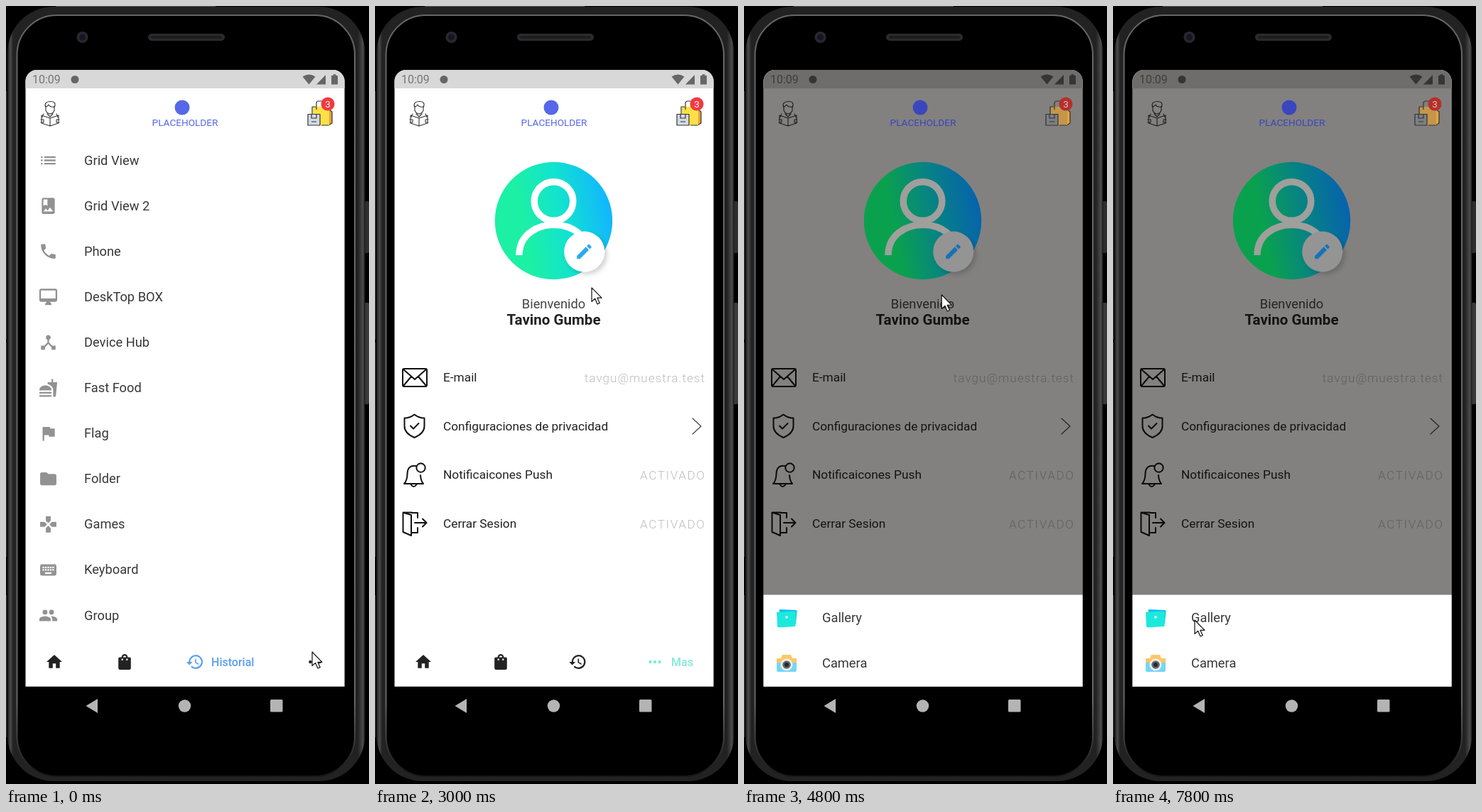
Write an HTML page that moves like this. It is 511 by 1096 pixels and loops after 8 s.

```html
<!DOCTYPE html>
<html lang="es">
<head>
<meta charset="utf-8">
<title>Perfil</title>
<style>
html, body { margin: 0; width: 100%; height: 100%; overflow: hidden; background: #000; }
svg {
  display: block; width: 511px; height: 1096px; font-family: Roboto, Arial, sans-serif;
  --brand: #5668e8; --bag: #fde047; --box: #d4dae4; --badge: #f23a3f; --badgeText: #fff;
  --a: #1cf0a4; --b: #12e3cf; --c: #12b4ff; --ring: #fff; --button: #fff; --pencil: #2caaf0;
}
svg.dim {
  --brand: #3a46bd; --bag: #c4964a; --box: #7c7f84; --badge: #b5302c; --badgeText: #d8c4c0;
  --a: #0aa14e; --b: #078580; --c: #0662ae; --ring: #9f9f9c; --button: #949494; --pencil: #1673b8;
}
.line { fill: none; stroke: #111; stroke-width: 2; stroke-linejoin: round; stroke-linecap: round; }
.item { font-size: 18.3px; fill: #383838; }
.row { font-size: 17.3px; fill: #222; }
.value { font-size: 17.14px; font-weight: 300; fill: #bdbdbd; text-anchor: end; }
.nav { font-size: 16px; font-weight: 500; }
</style>
</head>
<body>
<svg id="stage" viewBox="0 0 511 1096" xmlns="http://www.w3.org/2000/svg">
  <defs>
    <linearGradient id="metal">
      <stop offset="0" stop-color="#141414"/><stop offset=".008" stop-color="#4c4c4c"/>
      <stop offset=".016" stop-color="#222"/><stop offset=".98" stop-color="#222"/>
      <stop offset=".994" stop-color="#4c4c4c"/><stop offset="1" stop-color="#141414"/>
    </linearGradient>
    <linearGradient id="shine" x1="0" y1="0" x2="0" y2="1">
      <stop offset="0" stop-color="#666"/><stop offset=".9" stop-color="#666"/>
      <stop offset="1" stop-color="#161616"/>
    </linearGradient>
    <linearGradient id="skin" x1="0" y1=".6" x2="1" y2=".4">
      <stop offset="0" style="stop-color:var(--a)"/><stop offset=".25" style="stop-color:var(--a)"/>
      <stop offset=".58" style="stop-color:var(--b)"/><stop offset="1" style="stop-color:var(--c)"/>
    </linearGradient>
    <filter id="soft" x="-50%" y="-50%" width="200%" height="200%">
      <feDropShadow dx="3.5" dy="3.5" stdDeviation="3" flood-color="#000" flood-opacity=".18"/>
    </filter>
    <clipPath id="screen"><path d="M27.500 958.700V106a16 16 0 0 1 16-16H460.600a16 16 0 0 1 16 16V958.700z"/></clipPath>
  </defs>

  <g id="phone">
    <rect width="511" height="1096"/>
    <path d="M0 120V470M0 474V776M0 830V1030" stroke="#3a3a3a" stroke-width="2"/>
    <path d="M70 .5H295" stroke="#555"/>
    <rect x="504" y="275" width="7" height="73" rx="2" fill="#2e2e2e"/>
    <rect x="504" y="418" width="7" height="143" rx="2" fill="#3a3a3a"/>
    <rect x="2" y="1" width="503.500" height="1091" rx="65" fill="url(#metal)"/>
    <rect x="15.500" y="13" width="475.500" height="1072" rx="56" stroke="url(#shine)" stroke-width="2"/>
    <rect x="200" y="39" width="108" height="10" rx="5" fill="#2b2b2d"/>
    <rect x="204" y="42" width="100" height="4" rx="2" fill="#1d1d1f"/>
    <circle cx="107.500" cy="44" r="8" fill="#29292c"/>
    <circle cx="107.500" cy="44" r="4.500" fill="#14152c"/>
    <g fill="#b4b4b4">
      <path d="M112.500 986L129 976V996z"/>
      <circle cx="251.500" cy="986" r="8.700"/>
      <rect x="372" y="977" width="17.500" height="17.500" rx="1.500"/>
    </g>
  </g>

  <g clip-path="url(#screen)">
    <rect x="27" y="90" width="450" height="869" fill="#fff"/>
    <rect x="27" y="90" width="450" height="26" fill="#d8d8d8"/>
    <g fill="#666">
      <text x="37" y="109" font-size="16" fill="#777">10:09</text>
      <circle cx="97" cy="103.500" r="5.500"/>
      <path d="M417.500 99.500Q426.500 93.500 435.500 99.500L426.500 110.500z"/>
      <path d="M437 110.500L450 97V110.500z"/>
      <path d="M458 98h2.500v-1.800h4V98H467v12.500h-9z"/>
    </g>
    <g id="reader" class="line" style="stroke:#333;stroke-width:1.100">
      <path d="M56 141V147Q58 152 62 152Q66 152 68 147V141"/>
      <path d="M55.500 142Q53.500 135 62 134.500Q71 134 68.500 142Q62 143 60 139Q58 142 55.500 142z"/>
      <path d="M53 152Q51 155 51 157M71 152Q73 155 73 157M58 152L62 156L66 152"/>
      <path d="M50 154L62 158L74 154V165L62 169L50 165zM62 158V169M49 160h4v4h-4M75 160h-4v4h4"/>
    </g>
    <g id="list"></g>
    <g id="profile">
      <text x="251.500" y="426" font-size="18.300" text-anchor="middle" fill="#444">Bienvenido</text>
      <text x="251.500" y="449" font-size="20.570" font-weight="700" text-anchor="middle" fill="#222">Tavino Gumbe</text>
      <g class="row">
        <text x="96" y="529">E-mail</text>
        <text x="96" y="597.500">Configuraciones de privacidad</text>
        <text x="96" y="666">Notificaicones Push</text>
        <text x="96" y="735">Cerrar Sesion</text>
      </g>
      <g class="value">
        <text x="465" y="529.500" letter-spacing="1">tavgu@muestra.test</text>
        <text x="465.500" y="667" letter-spacing="1.600">ACTIVADO</text>
        <text x="465.500" y="735.500" letter-spacing="1.600">ACTIVADO</text>
      </g>
      <g class="line">
        <path d="M41 511H71Q73 511 73 513V534Q73 536 71 536H41Q39 536 39 534V513Q39 511 41 511zM40 512L56 526L72 512M40 535L51 522M72 535L61 522"/>
        <g class="loaded">
          <path d="M55.500 575.500Q62 580.500 69.500 580.500V592Q69.500 602 55.500 608Q41.500 602 41.500 592V580.500Q49 580.500 55.500 575.500zM50 591.500L54 595.500L61.500 588"/>
          <path d="M58 648Q46 646 45.500 659Q45.500 668 41 673H68Q64.500 669 64 661M50.500 674Q54.500 680 58.500 674"/>
          <circle cx="64.500" cy="650.500" r="6.200"/>
          <path d="M52 714H60V721M60 735V742H51M39.500 713.500L51 717V746L39.500 741zM39.500 713.500H52M56 728H72M67 722.500L72.500 728L67 733.500"/>
          <path d="M447 581L459 592L447 603" stroke="#444" stroke-width="1.200"/>
        </g>
      </g>
    </g>
    <g id="nav"></g>
    <rect id="shade" x="27" y="90" width="450" height="869" fill="#060500" opacity=".5"/>

    <g id="art">
      <circle cx="248" cy="143" r="10.500" fill="var(--brand)"/>
      <text x="252" y="168.500" font-size="13.600" text-anchor="middle" fill="var(--brand)">PLACEHOLDER</text>
      <g stroke="#333" stroke-width="1.200" stroke-linejoin="round">
        <path d="M454 145L459 149V165L454 168z" fill="#e8a33c"/>
        <path d="M432 142H455V168H432z" fill="var(--bag)" stroke="none"/>
        <path d="M437 146V137Q437 134 440 134H445Q448 134 448 137V146M431 152V142H436M454 168H444" fill="none"/>
        <path d="M425 152.500H442V168H425z" fill="var(--box)"/>
        <path d="M430 152.500V158H437V152.500M430 163H437" fill="none"/>
      </g>
      <circle cx="453" cy="138" r="9.600" fill="var(--badge)"/>
      <text x="453" y="143" font-size="13.500" text-anchor="middle" fill="var(--badgeText)">3</text>
      <g id="face">
        <g class="loaded">
          <circle cx="251.500" cy="302.500" r="82.700" fill="url(#skin)"/>
          <g fill="none" stroke="var(--ring)" stroke-width="9.500">
            <circle cx="251.500" cy="275" r="27.300"/>
            <path d="M203 351C203 294 300.500 294 300.500 351"/>
          </g>
        </g>
        <g id="edit">
          <circle cx="294.700" cy="346" r="28.500" fill="var(--button)" filter="url(#soft)"/>
        </g>
      </g>
    </g>

    <g id="sheet">
      <rect x="27" y="829.500" width="450" height="130" fill="#fff"/>
      <text class="item" x="110" y="868">Gallery</text>
      <text class="item" x="110" y="932">Camera</text>
      <g id="sheetIcons">
        <path d="M50 850L73 851Q75 851 74.500 853L73 870L48 868z" fill="#10bdf2"/>
        <path d="M46 854L71 852.500Q73 852.500 73 854.500L72.500 874L49 875.500Q47 875.500 47 873.500z" fill="#1ce9dd"/>
        <circle cx="60" cy="861" r="1.800" fill="#fff"/>
        <path d="M46 919H52L54 914H66L68 919H74V926H46z" fill="#fdc766"/>
        <path d="M46 925H74V936Q74 938 72 938H48Q46 938 46 936z" fill="#74d6fa"/>
        <circle cx="60" cy="928" r="8.500" fill="#f3eee6"/>
        <circle cx="60" cy="928" r="5.800" fill="#5d6670"/>
        <circle cx="60" cy="928" r="3" fill="#22282e"/>
      </g>
    </g>
  </g>
  <path id="cursor" d="M0 0V19.500L4.600 15.400L8 23L11.200 21.600L7.900 14.300H14z" fill="#fff" stroke="#111" stroke-width="1.200" stroke-linejoin="round"/>
</svg>

<script>
const $ = id => document.getElementById(id);
const icon = (d, x, y, s) =>
  `<path fill-rule="evenodd" transform="translate(${x} ${y}) scale(${s}) translate(-12 -12)" d="${d}"/>`;

// Menu rows: label and 24-unit icon
const rows = [
  ['Grid View', 'M3 11h2v2H3zM3 15h2v2H3zM3 7h2v2H3zM7 11h14v2H7zM7 15h14v2H7zM7 7h14v2H7z'],
  ['Grid View 2', 'M18 2H6c-1.100 0-2 .9-2 2v16c0 1.100.9 2 2 2h12c1.100 0 2-.9 2-2V4c0-1.100-.9-2-2-2zM6 4h5v8l-2.500-1.500L6 12zM6 19l3-3.860 2.140 2.580 3-3.860L18 19z'],
  ['Phone', 'M6.620 10.790c1.440 2.830 3.760 5.140 6.590 6.590l2.200-2.200c.27-.27.67-.36 1.020-.24 1.120.37 2.330.57 3.570.57.55 0 1 .45 1 1V20c0 .55-.45 1-1 1-9.390 0-17-7.610-17-17 0-.55.45-1 1-1h3.500c.55 0 1 .45 1 1 0 1.250.2 2.450.57 3.570.11.35.03.74-.25 1.020z'],
  ['DeskTop BOX', 'M21 2H3c-1.100 0-2 .9-2 2v12c0 1.100.9 2 2 2h7l-2 3v1h8v-1l-2-3h7c1.100 0 2-.9 2-2V4c0-1.100-.9-2-2-2zM21 14H3V4h18z'],
  ['Device Hub', 'M17 16l-4-4V8.820C14.160 8.400 15 7.300 15 6c0-1.660-1.340-3-3-3S9 4.340 9 6c0 1.300.84 2.400 2 2.820V12l-4 4H3v5h5v-3.050l4-4.200 4 4.200V21h5v-5z'],
  ['Fast Food', 'M18.060 23h1.660c.84 0 1.530-.64 1.630-1.460L23 5.050h-5V1h-1.970v4.050h-4.970l.3 2.340c1.710.47 3.310 1.320 4.270 2.260 1.440 1.420 2.430 2.890 2.430 5.290zM1 21h15v1q0 1-1 1H2q-1 0-1-1zM16 15c0-8-15-8-15 0zM1 17h15v2H1z'],
  ['Flag', 'M14.400 6L14 4H5v17h2v-7h5.600l.4 2h7V6z'],
  ['Folder', 'M10 4H4c-1.100 0-2 .9-2 2v12c0 1.100.9 2 2 2h16c1.100 0 2-.9 2-2V8c0-1.100-.9-2-2-2h-8z'],
  ['Games', 'M15 7.500V2H9v5.500l3 3zM7.500 9H2v6h5.500l3-3zM9 16.500V22h6v-5.500l-3-3zM16.500 9l-3 3 3 3H22V9z'],
  ['Keyboard', 'M20 5H4q-2 0-2 2v10q0 2 2 2h16q2 0 2-2V7q0-2-2-2z'
    + [5, 8, 11, 14, 17].map(x => `M${x} 8h2v2h-2zM${x} 11h2v2h-2z`).join('') + 'M8 15h8v2H8z'],
  ['Group', 'M16 11a3 3 0 1 0 0-6 3 3 0 0 0 0 6zM8 11a3 3 0 1 0 0-6 3 3 0 0 0 0 6zM8 13c-2.330 0-7 1.170-7 3.500V19h14v-2.500c0-2.330-4.670-3.500-7-3.500zM16 13l-1 .05c1.160.84 2 1.970 2 3.450V19h6v-2.500c0-2.330-4.670-3.500-7-3.500z']
];
$('list').innerHTML = rows.map(([label, d], i) => {
  const y = 217.5 + 64.1 * i;
  return `<g fill="#929292">${icon(d, 59.5, y, 1.143)}</g><text class="item" x="110" y="${y + 6}">${label}</text>`;
}).join('');

$('edit').innerHTML += `<g fill="var(--pencil)">${icon('M3 17.250V21h3.750L17.810 9.940l-3.750-3.750zM20.710 7.040q.7-.7 0-1.410l-2.340-2.340q-.7-.7-1.410 0l-1.830 1.830 3.750 3.750z', 294.500, 346, 1.143)}</g>`;

// Bottom tabs: icon, x before and after the switch, colour before and after, label
const DARK = '#222', BLUE = '#5a9ff0', MINT = '#84ead8';
const tabs = [
  ['M10 20v-6h4v6h5v-8h3L12 3 2 12h3v8z', 68, 68, DARK, DARK, ''],
  ['M18.500 6H16a4 4 0 0 0-8 0H5.500q-1.500 0-1.500 1.500V20q0 2 2 2h12q2 0 2-2V7.500q0-1.500-1.500-1.500zM12 4q2 0 2 2h-4q0-2 2-2zM8 8h2v2H8zM14 8h2v2h-2z', 167, 177, DARK, DARK, ''],
  ['M13 3a9 9 0 0 0-9 9H1l3.900 4L9 12H6a7 7 0 1 1 2.060 4.940l-1.420 1.420A9 9 0 1 0 13 3zM12 8v5l4.280 2.540.72-1.210-3.500-2.080V8z', 266, 285.5, BLUE, DARK, 'Historial'],
  [[6, 12, 18].map(x => `M${x - 2} 12a2 2 0 1 0 4 0a2 2 0 1 0-4 0z`).join(''), 435, 394, DARK, MINT, 'Mas']
];
$('nav').innerHTML = tabs.map(([d, , , , , label]) =>
  `<g>${icon(d, 0, 924, 1.1)}<text class="nav" x="23" y="929.500">${label}</text></g>`).join('');

function setNav(p) {
  tabs.forEach(([, x0, x1, c0, c1, label], i) => {
    const g = $('nav').children[i];
    g.setAttribute('transform', `translate(${x0 + (x1 - x0) * p} 0)`);
    g.setAttribute('fill', p < 0.5 ? c0 : c1);
    g.lastChild.setAttribute('opacity', label === 'Mas' ? p : 1 - p);
  });
}

// Pointer stops: time, x, y; equal neighbours are pauses
const stops = [
  [0, 431, 910], [200, 437, 933], [2000, 437, 933], [3200, 294.5, 354],
  [4600, 294.5, 354], [5600, 138, 863], [6600, 138, 863], [7000, 115, 865], [8000, 115, 865]
];
function pointer(t) {
  const i = stops.findIndex(s => s[0] > t);
  const [t0, x0, y0] = stops[i - 1], [t1, x1, y1] = stops[i];
  const u = (t - t0) / (t1 - t0), e = u * u * (3 - 2 * u);
  return `translate(${x0 + (x1 - x0) * e} ${y0 + (y1 - y0) * e})`;
}

const show = (el, on) => { el.style.display = on ? '' : 'none'; };
const loaded = document.querySelectorAll('.loaded');
const LOOP = 8000, STEP = 200;

function draw() {
  const t = Math.floor(performance.now() % LOOP / STEP) * STEP;
  const profile = t >= 800, dim = t >= 4000;
  show($('list'), !profile);
  show($('profile'), profile);
  show($('face'), profile);
  loaded.forEach(el => show(el, t >= 1200));
  setNav(t < 1200 ? 0 : t < 1400 ? 0.5 : 1);
  $('edit').setAttribute('opacity', t >= 3600 && !dim ? 0.35 : 1);
  show($('shade'), dim);
  show($('sheet'), dim);
  show($('sheetIcons'), t >= 4800);
  $('stage').classList.toggle('dim', dim);
  $('cursor').setAttribute('transform', pointer(t));
  requestAnimationFrame(draw);
}
draw();
</script>
</body>
</html>
```
